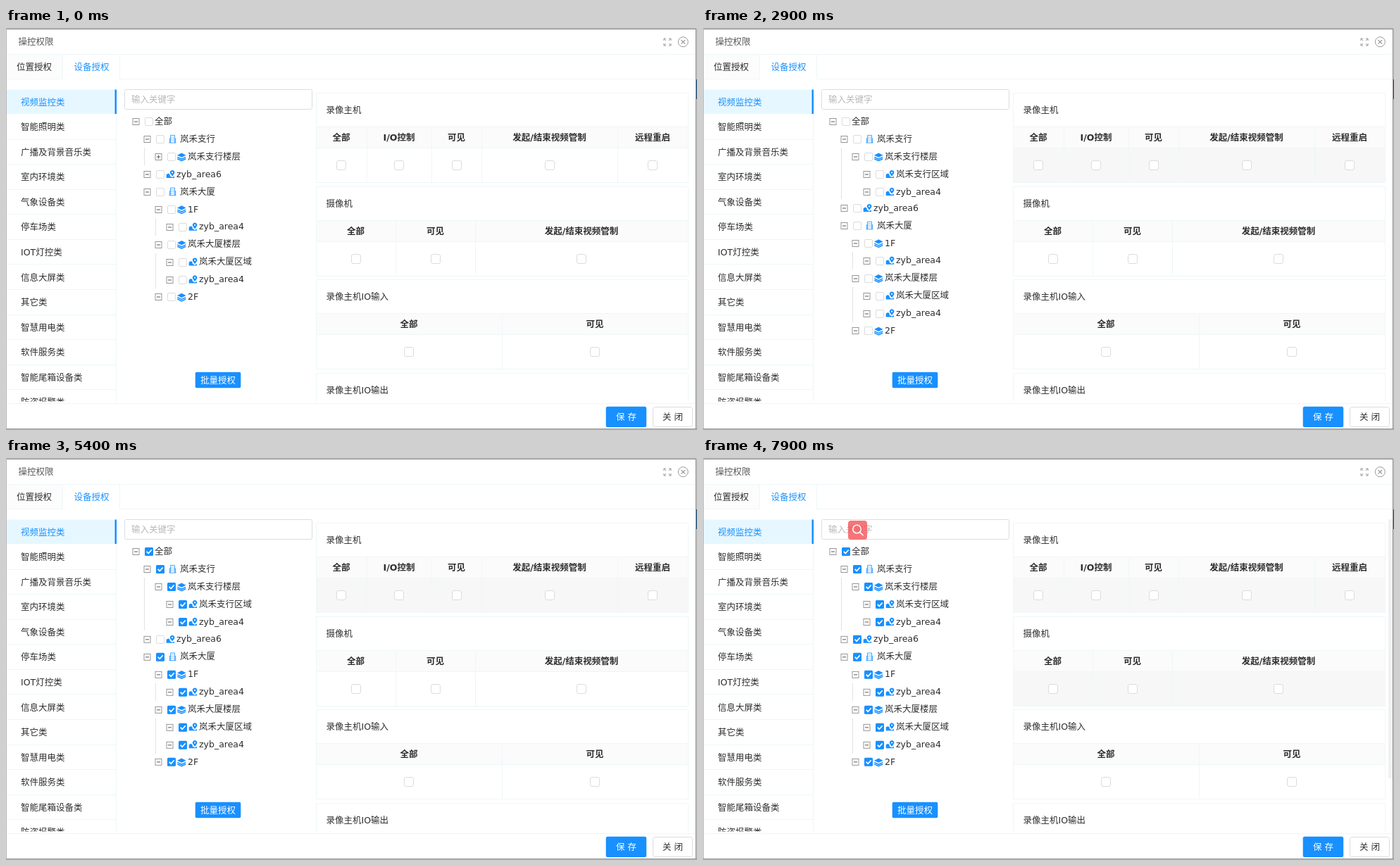
An HTML page that plays this animation: 981x571 px, repeating every 8 s.

```html
<!DOCTYPE html>
<html lang="zh-CN">
<head>
<meta charset="utf-8">
<title>操控权限</title>
<style>
html, body { margin: 0; width: 100%; height: 100%; overflow: hidden; background: #fff; }
svg { display: block; width: 981px; height: 571px; }
text { font: 12.5px "DejaVu Sans", "Noto Sans CJK SC", "Noto Sans CJK", "Noto Sans", sans-serif; white-space: pre; }
</style>
</head>
<body>
<svg id="stage" viewBox="0 0 981 571" xmlns="http://www.w3.org/2000/svg"></svg>
<script>
const BLUE = '#1890ff', LINE = '#eef7f9', INK = '#2e2e2e', EDGE = '#dcdcdc', BRANCH = '#e2e2e2';
const ROW = 24.9, LOOP = 8000;
const stage = document.getElementById('stage');

function el(parent, tag, attrs = {}) {
  const node = document.createElementNS('http://www.w3.org/2000/svg', tag);
  for (const k in attrs) node.setAttribute(k, attrs[k]);
  return parent.appendChild(node);
}
const group = (p, attrs) => el(p, 'g', attrs);
const rect = (p, x, y, width, height, fill, more) => el(p, 'rect', { x, y, width, height, fill, ...more });
const box = (p, x, y, w, h, stroke, rx = 0, fill = '#fff') =>
  rect(p, x + .5, y + .5, w - 1, h - 1, fill, { stroke, rx });
const hline = (p, x, y, w, c = LINE) => rect(p, x, y, w, 1, c);
const vline = (p, x, y, h, c = LINE) => rect(p, x, y, 1, h, c);
const path = (p, d, attrs) => el(p, 'path', { d, fill: 'none', ...attrs });
function text(p, str, x, cy, fill = INK, more = {}) {
  el(p, 'text', { x, y: cy + 4.6, fill, ...more }).textContent = str;
}
const centered = (p, str, x, cy, fill, weight = 400) =>
  text(p, str, x, cy, fill, { 'text-anchor': 'middle', style: `font-weight:${weight}` });
function clip(id, x, y, width, height) {
  return el(el(stage, 'clipPath', { id }), 'rect', { x, y, width, height });
}

clip('body', 0, 74, 979, 456.5);
const kidsClip = clip('kids', 168, 195, 267, 0);
rect(stage, 0, 0, 981, 571, '#fff');

// Title bar
text(stage, '操控权限', 17.5, 19.5, '#595959');
path(stage, 'M937 18l-3-3m0 3v-3h3M941 18l3-3m-3 0h3v3M937 22l-3 3m0-3v3h3M941 22l3 3m-3 0h3v-3',
  { stroke: '#999' });
el(stage, 'circle', { cx: 961.3, cy: 19.7, r: 7, fill: 'none', stroke: '#999' });
path(stage, 'M958.5 17l5.6 5.6m0-5.6l-5.6 5.6', { stroke: '#999', 'stroke-width': 1.2 });
hline(stage, 0, 37, 979);

// Tabs
rect(stage, 0, 38, 80, 34, '#fcfcfc');
vline(stage, 80, 38, 34);
vline(stage, 161, 38, 34);
hline(stage, 0, 72, 81);
hline(stage, 161, 72, 818);
text(stage, '位置授权', 15, 55);
text(stage, '设备授权', 96.5, 55, BLUE);

// Category menu
const menu = group(stage, { 'clip-path': 'url(#body)' });
vline(menu, 156, 88, 443);
['视频监控类', '智能照明类', '广播及背景音乐类', '室内环境类', '气象设备类', '停车场类', 'IOT灯控类',
 '信息大屏类', '其它类', '智慧用电类', '软件服务类', '智能尾箱设备类', '防盗报警类'].forEach((name, i) => {
  const y = 105 + i * 35.57;
  if (!i) {
    rect(menu, 0, 87.5, 157, 34.5, '#e6f7ff');
    rect(menu, 154.5, 87.5, 2.5, 34.5, BLUE);
  } else hline(menu, 0, Math.round(y + 17), 157);
  text(menu, name, 21, y, i ? INK : BLUE);
});

// Search field
box(stage, 168, 87, 267, 29, EDGE, 2);
text(stage, '输入关键字', 178, 101.5, '#b8b8b8');

// Tree
const icons = {
  building(p, x, y) {
    path(p, `M${x - 3} ${y + 5}v-10.5h6v10.5M${x - 5} ${y + 5.2}h10M${x - 3} ${y - 1}h-1.2v6M${x + 3} ${y - 1}h1.2v6`,
      { stroke: BLUE, 'stroke-width': .8 });
    path(p, `M${x - 1.2} ${y - 3.5}v6.5M${x + 1.2} ${y - 3.5}v6.5`,
      { stroke: BLUE, 'stroke-width': .8, 'stroke-dasharray': '1.4 1.2' });
  },
  layers(p, x, y) {
    path(p, `M${x} ${y - 5.2}l6.3 3.1l-6.3 3.1l-6.3 -3.1z`, { fill: BLUE });
    path(p, `M${x - 6} ${y + .6}l6 2.9l6 -2.9M${x - 6} ${y + 3}l6 2.9l6 -2.9`, { stroke: BLUE, 'stroke-width': 1.5 });
  },
  area(p, x, y) {
    path(p, `M${x - 5.8} ${y + 5.3}v-5l3 -1.4l2 1.6v2l3.3 2l3 -1.6v2.4z`, { fill: BLUE });
    path(p, `M${x + 2.6} ${y + 3}l-2.6 -3.6a3.2 3.2 0 1 1 5.2 0z`, { fill: BLUE });
    el(p, 'circle', { cx: x + 2.6, cy: y - 2.4, r: 1.1, fill: '#fff' });
  }
};
const iconShift = { building: [36.5, 47], layers: [33.3, 42], area: [33.5, 42] };

function treeRow(p, index, level, name, icon) {
  const y = 132.4 + index * ROW, x = 184 + level * 16, cy = Math.round(y) + .5;
  rect(p, x - 4, cy - 4, 9, 9, '#fff', { stroke: '#8c8c8c', 'stroke-width': .9 });
  path(p, `M${x - 2} ${cy + .5}h5`, { stroke: '#595959' });
  const plus = path(p, `M${x + .5} ${cy - 2}v5`, { stroke: '#595959', display: 'none' });
  rect(p, x + 13.5, cy - 5, 11, 11, '#fff', { stroke: EDGE, rx: 1.5 });
  const mark = group(p);
  rect(mark, x + 13, cy - 5.5, 12, 12, BLUE, { rx: 1.5 });
  path(mark, `M${x + 15.7} ${cy + .3}l2.5 2.7l4.5 -5`, { stroke: '#fff', 'stroke-width': 1.7 });
  const [ix, tx] = iconShift[icon] || [0, 27];
  if (icon) icons[icon](p, x + ix, y + .6);
  text(p, name, x + tx, y);
  return { mark, plus };
}

const upper = group(stage), kids = group(stage, { 'clip-path': 'url(#kids)' }), lower = group(stage);
const branchLine = vline(stage, 196, 170, 25, BRANCH);
const first = [
  treeRow(upper, 0, 0, '全部'),
  treeRow(upper, 1, 1, '岚禾支行', 'building'),
  treeRow(upper, 2, 2, '岚禾支行楼层', 'layers'),
  treeRow(kids, 3, 3, '岚禾支行区域', 'area'),
  treeRow(kids, 4, 3, 'zyb_area4', 'area')
];
const { plus } = first[2];
const lone = [treeRow(lower, 3, 1, 'zyb_area6', 'area')];
const second = [
  [1, '岚禾大厦', 'building'], [2, '1F', 'layers'], [3, 'zyb_area4', 'area'],
  [2, '岚禾大厦楼层', 'layers'], [3, '岚禾大厦区域', 'area'], [3, 'zyb_area4', 'area'], [2, '2F', 'layers']
].map((r, i) => treeRow(lower, i + 4, ...r));
vline(lower, 212, 270, 25, BRANCH);
vline(lower, 212, 320, 50, BRANCH);

rect(stage, 268.7, 488.7, 64.6, 22.6, BLUE, { rx: 2 });
centered(stage, '批量授权', 301, 500, '#fff', 500);

// Permission tables
const tables = group(stage, { 'clip-path': 'url(#body)' });
function table(index, title, edges, heads) {
  const y = 92 + index * 132.5, r = Math.round;
  box(tables, 440, r(y), 529, 128, LINE);
  text(tables, title, 454.5, y + 24.5);
  rect(tables, 441, r(y + 49), 527, 30, '#fbfbfb');
  hline(tables, 441, r(y + 48), 527);
  const hover = rect(tables, 441, r(y + 79), 527, 48, '#f7f7f7', { opacity: 0 });
  hline(tables, 441, r(y + 78), 527);
  const xs = [440, ...edges, 968];
  edges.forEach(x => vline(tables, x, r(y + 49), 78));
  heads.forEach((head, i) => {
    const cx = (xs[i] + xs[i + 1]) / 2;
    centered(tables, head, cx, y + 63.7, INK, 700);
    box(tables, r(cx - 7), r(y + 96), 14, 14, EDGE, 2.5);
  });
  return hover;
}
const hostHover = table(0, '录像主机', [512, 604, 675, 868], ['全部', 'I/O控制', '可见', '发起/结束视频管制', '远程重启']);
const cameraHover = table(1, '摄像机', [553, 666], ['全部', '可见', '发起/结束视频管制']);
table(2, '录像主机IO输入', [704], ['全部', '可见']);
table(3, '录像主机IO输出', [704], ['全部', '可见']);
const scrollbar = rect(stage, 973, 87, 6, 368, '#f1f1f1');

// Footer
hline(stage, 0, 533, 979);
rect(stage, 851.7, 537.8, 57.5, 29.2, BLUE, { rx: 2.5 });
centered(stage, '保 存', 880.5, 552.5, '#fff', 500);
box(stage, 918, 538, 57, 29, EDGE, 3);
centered(stage, '关 闭', 946.5, 552.5);

// Window edge
hline(stage, 0, 0, 981, '#c4c4c4');
hline(stage, 0, 1, 981, '#858585');
vline(stage, 0, 1, 569, '#b5b5b5');
vline(stage, 979, 1, 569, '#858585');
vline(stage, 980, 1, 569, '#d0d0d0');
hline(stage, 0, 569, 981, '#858585');
hline(stage, 0, 570, 981, '#c4c4c4');
vline(stage, 980, 73, 28, '#245a85');

// Floating search badge
const badge = group(stage);
rect(badge, 206, 89, 27, 27, '#f5565a', { rx: 4 });
el(badge, 'circle', { cx: 218.5, cy: 101, r: 5.8, fill: 'none', stroke: '#fff', 'stroke-width': 1.5 });
path(badge, 'M222.8 105.3l4.2 4.2', { stroke: '#fff', 'stroke-width': 1.7, 'stroke-linecap': 'round' });

const show = (node, on) => node.setAttribute('display', on ? 'inline' : 'none');
const check = (rows, on) => rows.forEach(row => show(row.mark, on));

function render(t) {
  const open = t < 2800 ? 0 : t < 2900 ? 13.3 : t < 3000 ? 48 : 2 * ROW;
  kidsClip.setAttribute('height', open);
  lower.setAttribute('transform', `translate(0 ${open})`);
  branchLine.setAttribute('height', 25 + open);
  show(plus, !open);

  const all = t >= 7200;
  check(first, all || t >= 4000 && t < 6900);
  check(second, all || t >= 5400 && t < 6900);
  check(lone, all);

  const step = Math.max(0, Math.min(4, Math.floor((t - 7500) / 100)));
  hostHover.setAttribute('opacity', t >= 600 ? 1 : 0);
  cameraHover.setAttribute('opacity', step / 4);
  show(scrollbar, t >= 600 && t < 2800 || t >= 7600);
  show(badge, all);
  badge.setAttribute('opacity', t < 7400 ? 1 : .95 - step * .035);
}

const start = performance.now();
function frame() {
  render((performance.now() - start) % LOOP);
  requestAnimationFrame(frame);
}
frame();
</script>
</body>
</html>
```
